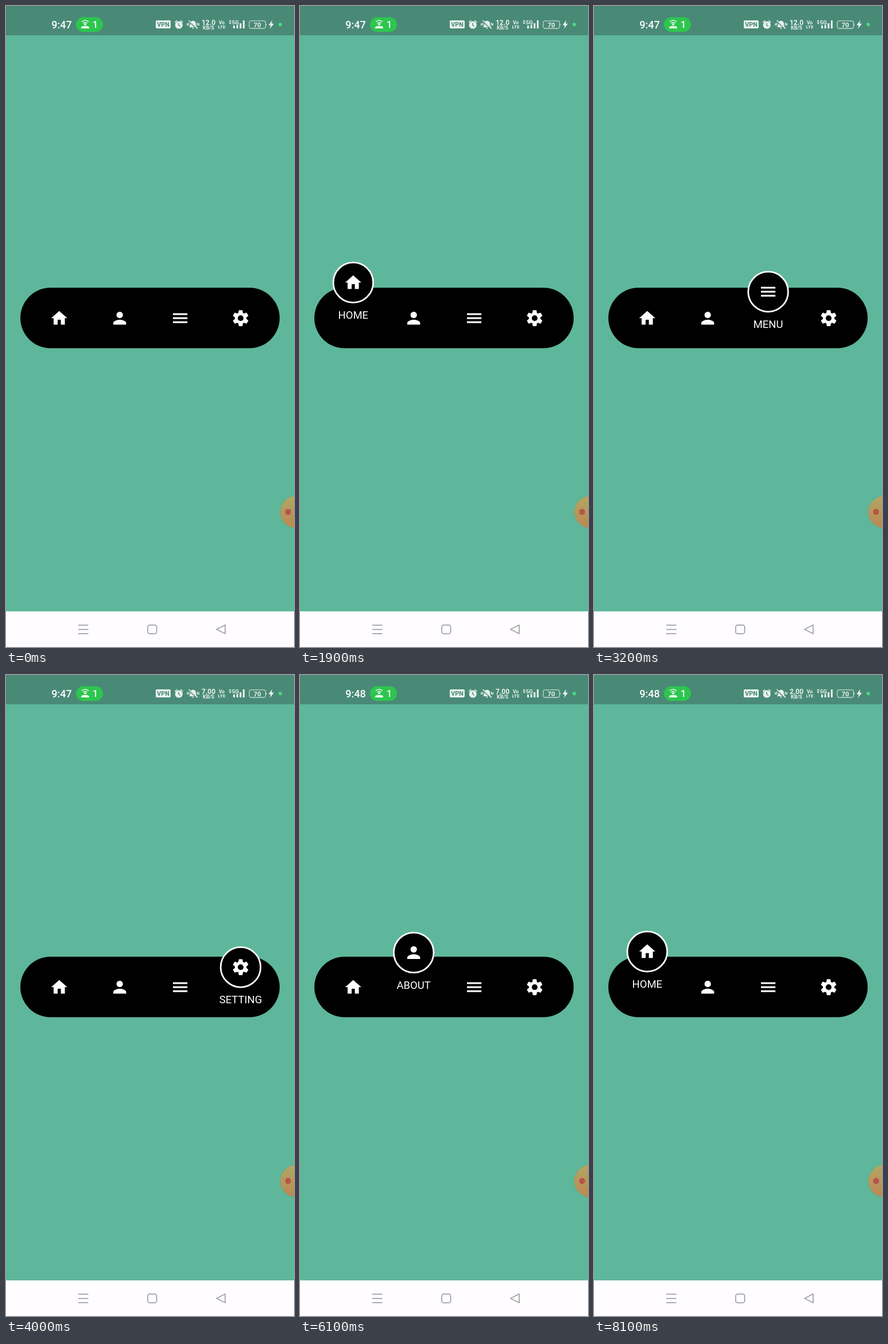
Write an HTML page that moves like this. It is 502 by 1115 pixels and loops after 8.3 s.

```html
<!DOCTYPE html>
<html lang="en">
<head>
<meta charset="utf-8">
<title>Tab bar</title>
<style>
  html, body { margin: 0; width: 100%; height: 100%; overflow: hidden; background: #5eb79b; }
  svg { display: block; width: 100%; height: 100%; }
  text { font-family: Roboto, Inter, sans-serif; text-anchor: middle; }
  .label { font-size: 18.5px; fill: #fff; }
  .status { fill: #e9f2ef; }
  .status text { font-weight: 700; }
  .line { fill: none; stroke: #e9f2ef; stroke-width: 1.5; }
  .nav { fill: none; stroke: #929297; stroke-width: 1.5; stroke-linejoin: round; }
</style>
</head>
<body>
<svg viewBox="0 0 502 1115">
  <defs>
    <linearGradient id="gold" x2="0" y2="1">
      <stop offset="0" stop-color="#b0a866"/>
      <stop offset="1" stop-color="#bd8752"/>
    </linearGradient>
    <g id="home"><path d="M-2 8v-6h4v6h5v-8h3L0-9-10 0h3v8z"/></g>
    <g id="about"><circle cy="-4" r="4"/><path d="M0 2c-2.67 0-8 1.34-8 4v2h16v-2c0-2.66-5.33-4-8-4z"/></g>
    <g id="menu"><path d="M-9-6h18v2h-18zM-9-1h18v2h-18zM-9 4h18v2h-18z"/></g>
    <path id="cog" stroke="#fff" stroke-width=".6" stroke-linejoin="round"
      d="M-2-9.6h4l.5 3v13.2l-.5 3h-4l-.5-3v-13.2z"/>
    <g id="setting">
      <circle r="7.2"/>
      <use href="#cog"/><use href="#cog" transform="rotate(60)"/><use href="#cog" transform="rotate(120)"/>
      <circle r="3.6" fill="#000"/>
    </g>
  </defs>

  <rect width="502" height="1115" fill="#5eb79b"/>
  <rect width="502" height="51" fill="#498a76"/>
  <rect y="1053" width="502" height="62" fill="#fffdff"/>

  <g class="status">
    <text id="clock" x="97" y="38.5" font-size="18" style="font-weight:500" fill="#fff"></text>
    <rect x="122" y="19.5" width="47" height="25.5" rx="12.7" fill="#2dc64e"/>
    <path d="M131 39q0-4 4-4h6q4 0 4 4z" fill="#fff"/>
    <circle cx="138" cy="32" r="1.8" fill="#fff"/>
    <path class="line" d="M134.3 30.2q3.7-3.2 7.4 0M131.8 27.4q6.2-5 12.4 0"/>
    <text x="155.5" y="38.3" font-size="17" style="font-weight:500" fill="#fff">1</text>

    <rect x="261" y="25" width="26" height="14" rx="2"/>
    <text x="274" y="36" font-size="10.8" style="fill:#498a76">VPN</text>

    <circle cx="301.3" cy="33" r="6.6"/>
    <path class="line" d="M294.3 28.6l4-3.6M308.3 28.6l-4-3.6"/>
    <path d="M301 29.5v4l3 2" fill="none" stroke="#498a76" stroke-width="1.4"/>

    <path d="M319 37c2-2 2-4 2-6 0-7 10-7 10 0 0 2 0 4 2 6zM324 38h4q-2 3-4 0z"/>
    <path d="M318 25.5l15 14" stroke="#498a76" stroke-width="3"/>
    <path class="line" d="M318.6 25l15.4 14.4M316 30v4M318.5 29v5M333.6 29v5M336.2 30v4"/>

    <text id="speed" x="353" y="33" font-size="12"></text>
    <text x="353" y="40.8" font-size="8.8">KB/S</text>
    <text x="376" y="31.5" font-size="8.5">Vo</text>
    <text x="376" y="39.3" font-size="8">LTE</text>
    <path d="M388.3 27.3l2.4-3 2.4 3z"/>
    <path id="down" d="M388.3 28.8h4.8l-2.4 3z"/>
    <text x="399.8" y="32" font-size="9.8">5G</text>
    <path d="M396 34h3v5h-3zM401.7 33h3v6h-3zM407.3 30h3v9h-3zM412.9 25h3v14h-3z"/>

    <rect class="line" x="424" y="25.8" width="28.5" height="13.2" rx="3.5" style="stroke-width:1.3;stroke:#c5d9d2"/>
    <path d="M453.4 30.5q1.7 2 0 4z"/>
    <text x="438" y="36.5" font-size="11.5">70</text>
    <path d="M464 24.8l-6.3 8.6h3.8l-1.5 6.4 7-9h-4z"/>
    <circle cx="478" cy="32.2" r="3" fill="#46dc82"/>
  </g>

  <rect x="25" y="490" width="452" height="105.3" rx="52.65"/>
  <g id="tabs" fill="#fff"></g>

  <circle cx="506" cy="880" r="29" fill="#4f9b82" opacity=".35"/>
  <circle cx="506" cy="880" r="28" fill="url(#gold)"/>
  <circle cx="491.7" cy="880" r="5.2" fill="#b6534b"/>

  <g class="nav">
    <path d="M126 1077h17.5M126 1084.4h17.5M126 1091.8h17.5"/>
    <rect x="247" y="1076.7" width="15.6" height="15.4" rx="3.6"/>
    <path d="M367 1084.3l15-7.6v15.2z"/>
  </g>
</svg>
<script>
const LOOP = 8300, STEP = 100, RISE = 400, LIFT = 62, REST_Y = 543;
const $ = id => document.getElementById(id);
const names = ['home', 'about', 'menu', 'setting'];

// from: switch of the active tab, start: begin of its rise, end: last movement
const taps = [
  { from: 200, start: 150, end: 1200, tab: 'home' },
  { from: 2000, start: 1950, end: 3000, tab: 'about' },
  { from: 3200, start: 3022, end: 3400, tab: 'menu' },
  { from: 3900, start: 3870, end: 4200, tab: 'setting' },
  { from: 4900, start: 4890, end: 5300, tab: 'menu' },
  { from: 5900, start: 5788, end: 6100, tab: 'about' },
  { from: 6700, start: 6680, end: 7100, tab: 'home' },
];

$('tabs').innerHTML = names.map(name => `
  <g id="tab-${name}">
    <g class="active">
      <circle r="34.8" fill="#000" stroke="#fff" stroke-width="2.8"/>
      <text class="label" y="63">${name.toUpperCase()}</text>
    </g>
    <use href="#${name}" transform="scale(1.4)"/>
  </g>`).join('');

// cubic-bezier(.25, .1, .25, 1)
function ease(x) {
  const bezier = (a, b, s) => 3 * a * s * (1 - s) ** 2 + 3 * b * s * s * (1 - s) + s ** 3;
  let low = 0, high = 1;
  for (let i = 0; i < 20; i++) {
    const mid = (low + high) / 2;
    if (bezier(.25, .25, mid) < x) low = mid; else high = mid;
  }
  return bezier(.1, 1, low);
}

function draw(now) {
  const t = Math.floor(now % LOOP / STEP) * STEP;
  const tap = taps.filter(p => p.from <= t).pop();
  names.forEach((name, i) => {
    const active = tap?.tab === name;
    const progress = active ? Math.min(1, (Math.min(t, tap.end) - tap.start) / RISE) : 0;
    const y = REST_Y - LIFT * ease(progress);
    const group = $('tab-' + name);
    group.setAttribute('transform', `translate(${92.8 + 105.4 * i} ${y})`);
    group.querySelector('.active').style.display = active ? '' : 'none';
  });
  $('clock').textContent = t < 5500 ? '9:47' : '9:48';
  $('speed').textContent = t < 3900 ? '12.0' : t < 8000 ? '7.00' : '2.00';
  $('down').style.display = t >= 4900 && t < 5900 ? 'none' : '';
}

const begin = performance.now();
function tick() {
  draw(performance.now() - begin);
  requestAnimationFrame(tick);
}
tick();
</script>
</body>
</html>
```
